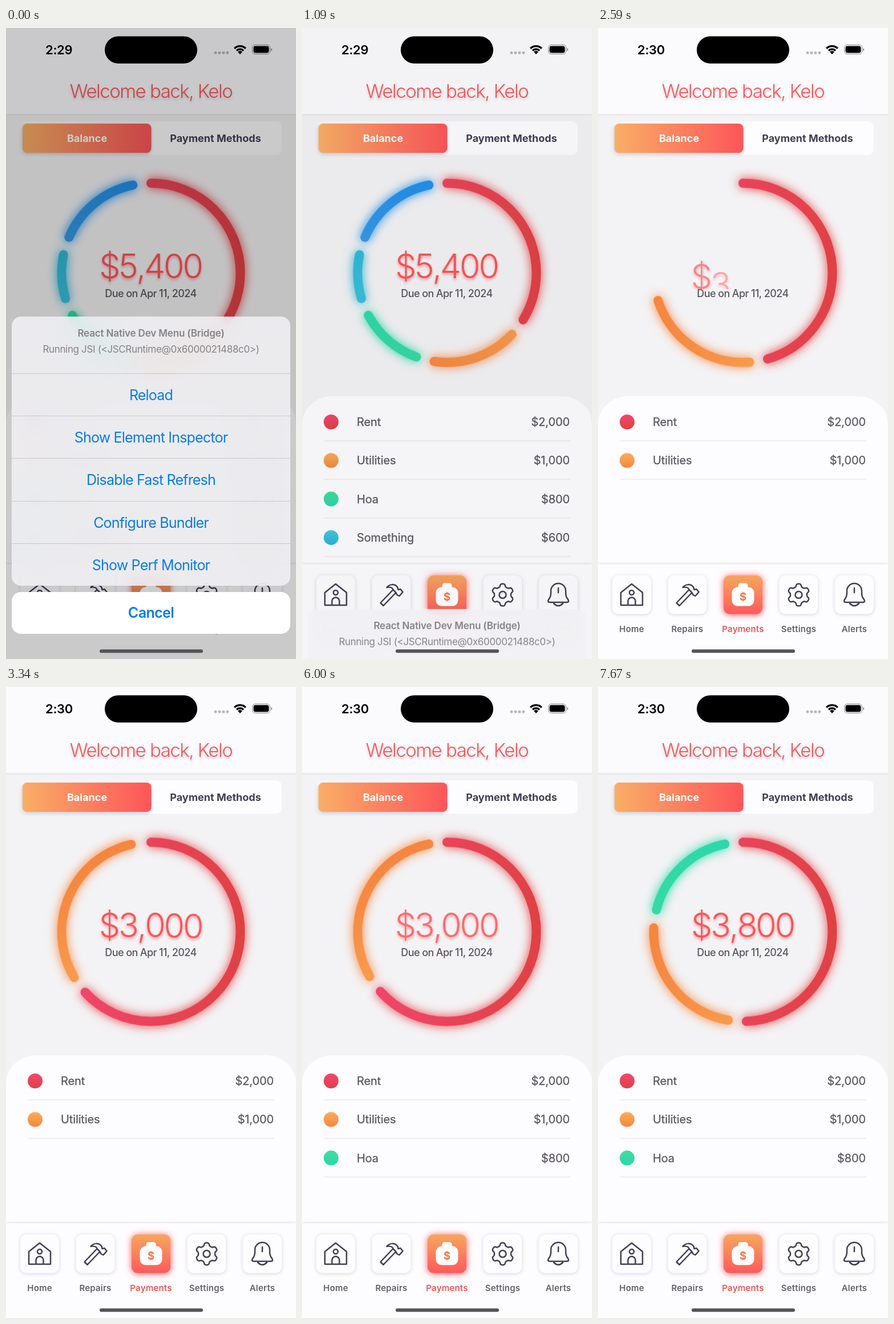
Write an HTML page that moves like this. It is 508 by 1102 pixels and loops after 8 s.

```html
<!DOCTYPE html>
<html lang="en">
<head>
<meta charset="utf-8">
<title>Payments</title>
<style>
  html, body { margin: 0; width: 100%; height: 100%; overflow: hidden; background: #fff; }
  body { position: relative; font-family: Inter, Roboto, sans-serif; }
  svg, #dim { position: absolute; left: 0; top: 0; width: 508px; height: 1102px; }
  text { dominant-baseline: central; }
  .mid { text-anchor: middle; }
  .end { text-anchor: end; }
  .row { font-size: 20px; letter-spacing: -.12px; fill: #59565d; stroke: #59565d; stroke-width: .25px; }
  .label { font-size: 15px; font-weight: 600; letter-spacing: .2px; fill: #636067; }
  .on .label { fill: #ef565b; }
  .tab { font-size: 18px; font-weight: 700; }
  .card { fill: #fdfcfe; filter: drop-shadow(0 1px 3px rgba(60, 50, 80, .2)); }
  .on .card { fill: url(#active); filter: drop-shadow(0 1px 6px rgba(250, 70, 75, .9)); }
  .icon { fill: none; stroke: #433f55; stroke-width: 2.5; stroke-linejoin: round; stroke-linecap: round; }
  .on .icon { fill: #fff; stroke: #fff; stroke-width: 1; }
  .coin { font-size: 19px; font-weight: 700; fill: #433f55; }
  .on .coin { fill: #f8764f; }
  #title { font-size: 33px; font-weight: 350; letter-spacing: -1.5px; filter: drop-shadow(0 3px 2px rgba(120, 70, 80, .22)); }
  #due { font-size: 18px; font-weight: 500; letter-spacing: -.6px; fill: #59565d; }
  #amount {
    position: absolute; left: 0; top: 376px; width: 506px; height: 80px; line-height: 80px;
    overflow: hidden; text-align: center; white-space: nowrap;
    font-size: 59px; font-weight: 350; letter-spacing: -3.1px;
    color: #fb5558; text-shadow: 0 3px 4px rgba(250, 70, 75, .45);
  }
  #amount span { display: inline-block; }
  #dim { background: #000; }
  #sheet { position: absolute; left: 10px; top: 504px; width: 488px; text-align: center; }
  #menu {
    height: 470px; border-radius: 16px; overflow: hidden;
    background: rgba(242, 241, 245, .86); backdrop-filter: blur(24px);
  }
  #info { height: 99px; color: #858388; font-size: 17px; line-height: 28px; }
  #info b { display: block; padding-top: 15px; font-weight: 600; letter-spacing: -.15px; }
  #info span { letter-spacing: -.35px; }
  .action {
    box-sizing: border-box; height: 74.2px; line-height: 74px; border-top: 1px solid rgba(60, 60, 67, .2);
    color: #0a7bea; font-size: 25px; letter-spacing: -.8px;
  }
  #cancel {
    margin-top: 11px; height: 73px; line-height: 73px; border-radius: 16px; background: #fff;
    color: #0a7bea; font-size: 25px; font-weight: 600; letter-spacing: -.6px;
  }
</style>
</head>
<body>
<svg id="app" viewBox="0 0 508 1102"></svg>
<div id="amount"></div>
<svg id="bars" viewBox="0 0 508 1102"></svg>
<div id="dim"></div>
<div id="sheet">
  <div id="menu"><div id="info"><b>React Native Dev Menu (Bridge)</b><span>Running JSI (&lt;JSCRuntime@0x6000021488c0&gt;)</span></div></div>
  <div id="cancel">Cancel</div>
</div>
<svg id="system" viewBox="0 0 508 1102"></svg>
<script>
const LOOP = 8000, FPS = 12, GAP = 11.7;
const RELOAD = 1580, SHELL = 1830, READY = 2000, ADDED = 6000;

const bills = [
  { name: 'Rent', cost: 2000, from: '#f3456f', to: '#e04144' },
  { name: 'Utilities', cost: 1000, from: '#f9ae58', to: '#f58640' },
  { name: 'Hoa', cost: 800, from: '#40dc9c', to: '#2bd8aa' },
  { name: 'Something', cost: 600, from: '#48cadb', to: '#2ab3d7' },
  { name: 'Other', cost: 1000, from: '#4ba2df', to: '#1d8eea' }
];

const $ = id => document.getElementById(id);
const show = (el, on) => { el.style.display = on ? '' : 'none'; };
const clamp = v => Math.min(1, Math.max(0, v));
const easeOut = v => 1 - (1 - clamp(v)) ** 3;
const text = (x, y, cls, str, extra = '') => `<text x="${x}" y="${y}" class="${cls}" ${extra}>${str}</text>`;
const gradient = (id, from, to, axis = 'x2="0" y2="1"') =>
  `<linearGradient id="${id}" x1="0" y1="0" ${axis}><stop stop-color="${from}"/><stop offset="1" stop-color="${to}"/></linearGradient>`;

// Six-toothed gear outline around the origin
function gearPath() {
  const points = [];
  for (let i = 0; i < 120; i++) {
    const a = i * Math.PI / 60;
    const r = 16.9 + 2.5 * Math.tanh(2 * Math.cos(6 * a));
    points.push(`${(r * Math.sin(a)).toFixed(1)} ${(-r * Math.cos(a)).toFixed(1)}`);
  }
  return `M${points.join('L')}Z`;
}

const icons = {
  Home: '<path d="M-19 -4L0 -19L19 -4V18H-19ZM-6.5 18V11a6.5 6.5 0 0 1 13 0V18"/><circle cy="-4" r="4"/>',
  Repairs: '<path d="M-19 14L3 -9L8 -4L-14 19ZM-8 -13C-3 -19 6 -20 11 -13L12 -9L16 -10L20 -5L14 2L10 0L8 -4L3 -9C2 -13 -3 -14 -8 -13Z"/>',
  Payments: '<path d="M-8 -13V-17Q-8 -20 -5 -20H5Q8 -20 8 -17V-13"/><rect x="-19" y="-13" width="38" height="32" rx="9"/>',
  Settings: `<path d="${gearPath()}"/><circle r="6"/>`,
  Alerts: '<path d="M-17 8C-12 3 -13 -3 -13 -7A13 13 0 0 1 13 -7C13 -3 12 3 17 8Q20 13 14 13H-14Q-20 13 -17 8ZM-8 15Q0 23 8 15M0 -12V-4"/>'
};

function buildApp() {
  const rows = bills.map((b, i) => {
    const y = 688 + i * 67.3;
    return `<g class="bill"><circle cx="51" cy="${y}" r="13" fill="url(#bill${i})"/>
      ${text(96, y, 'row', b.name)}${text(469, y, 'row end', '$' + b.cost.toLocaleString('en-US'))}
      <rect x="38" y="${y + 32}" width="432" height="2" fill="#efedf0"/></g>`;
  }).join('');
  const arcs = bills.map((b, i) =>
    `<circle class="arc" r="156.5" pathLength="360" fill="none" stroke="url(#bill${i})" stroke-width="16"
      stroke-linecap="round" style="filter:drop-shadow(0 0 9px ${b.to})"/>`).join('');

  $('app').innerHTML = `<defs>
      ${bills.map((b, i) => gradient('bill' + i, b.from, b.to)).join('')}
      ${gradient('active', '#f6a75d', '#fd5a5c')}${gradient('pill', '#f9ae66', '#fd5559', 'x2="1" y2="0"')}
    </defs>
    <g id="shell">
      <rect width="508" height="1102" fill="#f3f2f4"/>
      <rect y="-10" width="508" height="160.5" fill="#fbfafc" style="filter:drop-shadow(0 1px 1.5px rgba(60,50,80,.12))"/>
      ${text(254, 110, 'mid', 'Welcome back, Kelo', 'id="title"')}
      <g id="content">
        <rect class="card" x="25" y="163" width="458" height="58.5" rx="10" style="filter:none"/>
        <rect x="29" y="167" width="225.5" height="51" rx="8" fill="url(#pill)" style="filter:drop-shadow(-1px 2px 3px rgba(60,50,80,.3))"/>
        ${text(142, 192.5, 'tab mid', 'Balance', 'fill="#fff"')}
        ${text(367, 192.5, 'tab mid', 'Payment Methods', 'fill="#433f55"')}
        <g transform="translate(254 427.5)">${arcs}</g>
        ${text(253.5, 463, 'mid', 'Due on Apr 11, 2024', 'id="due"')}
        <path d="M0 940V692A54 49 0 0 1 54 643H454A54 49 0 0 1 508 692V940Z" fill="#fdfcfe"/>
        ${rows}
      </g>
    </g>`;
}

function buildBars() {
  const tabs = Object.keys(icons).map((name, i) => {
    const coin = name === 'Payments' ? text(0, 3.5, 'coin mid', '$') : '';
    return `<g id="${name}" transform="translate(${59 + i * 97.5} 990)">
      <rect class="card" x="-34" y="-34" width="68" height="67.5" rx="11"/>
      <g class="icon">${icons[name]}</g>${coin}${text(0, 59, 'label mid', name)}</g>`;
  }).join('');
  $('bars').innerHTML = `<g id="tabs">
    <rect y="936.5" width="508" height="170" fill="#fdfcfe" style="filter:drop-shadow(0 -1px 2px rgba(60,50,80,.16))"/>${tabs}</g>`;
}

function buildSystem() {
  const signal = [367, 374, 381, 388].map(x => `<rect x="${x - 2.3}" y="41" width="4.6" height="4.6" rx="1.4"/>`).join('');
  const wave = r => {
    const d = r * .7;
    return `<path d="M${410 - d} ${45.5 - d}A${r} ${r} 0 0 1 ${410 + d} ${45.5 - d}" fill="none" stroke="currentColor" stroke-width="3.3"/>`;
  };
  $('system').innerHTML = `
    <g id="banner"><rect width="508" height="89" fill="#403e41"/>
      ${text(254, 76.5, 'mid', 'Loading from Metro…', 'fill="#fff" font-size="15"')}</g>
    <rect x="173" y="14.5" width="162" height="47.5" rx="23.7"/>
    <g id="status" fill="currentColor">
      ${text(69, 38, '', '2:29', 'id="clock" font-size="22" font-weight="600" letter-spacing="-.3"')}
      <g opacity=".27">${signal}</g>
      ${wave(14)}${wave(8.6)}<path d="M410 46L406 41.7A5.8 5.8 0 0 1 414 41.7Z"/>
      <rect x="431.5" y="29.5" width="31" height="16" rx="5" fill="none" stroke="currentColor" opacity=".45"/>
      <rect x="433.5" y="31.5" width="27" height="12" rx="3.4"/>
      <path d="M464.3 35.2Q466.3 35.8 466.3 37.7T464.3 40.2Z" opacity=".5"/>
    </g>
    <rect x="164" y="1085.3" width="181" height="6" rx="3" fill="#555358"/>`;
}

// Share of the circle taken by each of the first `count` bills, as [start, end]
function shares(count) {
  const total = bills.slice(0, count).reduce((sum, b) => sum + b.cost, 0);
  let at = 0;
  return bills.map((b, i) => {
    const start = at;
    if (i < count) at += b.cost / total;
    return [start, at];
  });
}
const five = shares(5), two = shares(2), three = shares(3), none = bills.map(() => [0, 0]);

function drawRing(t) {
  const [from, to, p] = t < RELOAD ? [five, five, 1]
    : t < ADDED ? [none, two, easeOut((t - 2050) / 1500)]
    : [two, three, easeOut((t - 6050) / 1500)];
  arcs.forEach((arc, i) => {
    const [start, end] = [0, 1].map(k => 360 * (from[i][k] + (to[i][k] - from[i][k]) * p));
    const sweep = end - start - GAP;
    show(arc, sweep > 0);
    arc.setAttribute('transform', `rotate(${start - 90})`);
    arc.setAttribute('stroke-dasharray', `${Math.max(0, sweep)} 360`);
  });
}

function drawAmount(t) {
  const value = t < RELOAD ? '$5,400' : t < 6300 ? '$3,000' : '$3,800';
  const entry = t < RELOAD ? -2000 : t < 6300 ? 2340 : 6340;
  const fading = t >= ADDED && t < 6300;
  chars.forEach((char, i) => {
    const p = easeOut((t - entry - i * 100) / 750);
    char.textContent = value[i];
    char.style.opacity = fading ? clamp(.85 - (t - ADDED) / 300) : p;
    char.style.transform = `translateY(${60 * (1 - p)}px)`;
  });
}

function draw(t) {
  const ready = t < RELOAD || t >= READY;
  const count = t < RELOAD ? 5 : t < ADDED ? 2 : 3;
  const shell = t < RELOAD || t >= SHELL;

  show($('shell'), shell);
  show($('tabs'), shell);
  show($('content'), ready);
  show($('amount'), ready);
  $('title').setAttribute('fill', ready ? '#f9565a' : '#1e8fec');
  $('Payments').classList.toggle('on', ready);
  rows.forEach((row, i) => show(row, i < count));
  drawRing(t);
  drawAmount(t);

  const banner = t < RELOAD ? 0 : 1 - clamp((t - 2090) / 250);
  $('banner').style.opacity = banner;
  $('status').style.color = banner > .5 ? '#fff' : '#000';
  $('clock').textContent = t < 2500 ? '2:29' : '2:30';

  const k = 14.5 * Math.max(0, t - 850) / 1000;
  const open = (1 + k) * Math.exp(-k);
  show($('sheet'), t < 1500);
  show($('dim'), t < 1500);
  $('dim').style.opacity = .2 * open;
  $('sheet').style.transform = `translateY(${600 * (1 - open)}px)`;
  reload.style.background = t >= 500 ? 'rgba(0,0,0,.06)' : '';
}

buildApp();
buildBars();
buildSystem();
$('amount').innerHTML = '<span></span>'.repeat(6);
$('menu').insertAdjacentHTML('beforeend',
  ['Reload', 'Show Element Inspector', 'Disable Fast Refresh', 'Configure Bundler', 'Show Perf Monitor']
    .map(label => `<div class="action">${label}</div>`).join(''));

const arcs = [...document.querySelectorAll('.arc')];
const rows = [...document.querySelectorAll('.bill')];
const chars = [...$('amount').children];
const reload = document.querySelector('.action');
const begin = performance.now();

function tick() {
  const t = (performance.now() - begin) % LOOP;
  draw(Math.floor(t * FPS / 1000) * 1000 / FPS);
  requestAnimationFrame(tick);
}
tick();
</script>
</body>
</html>
```
